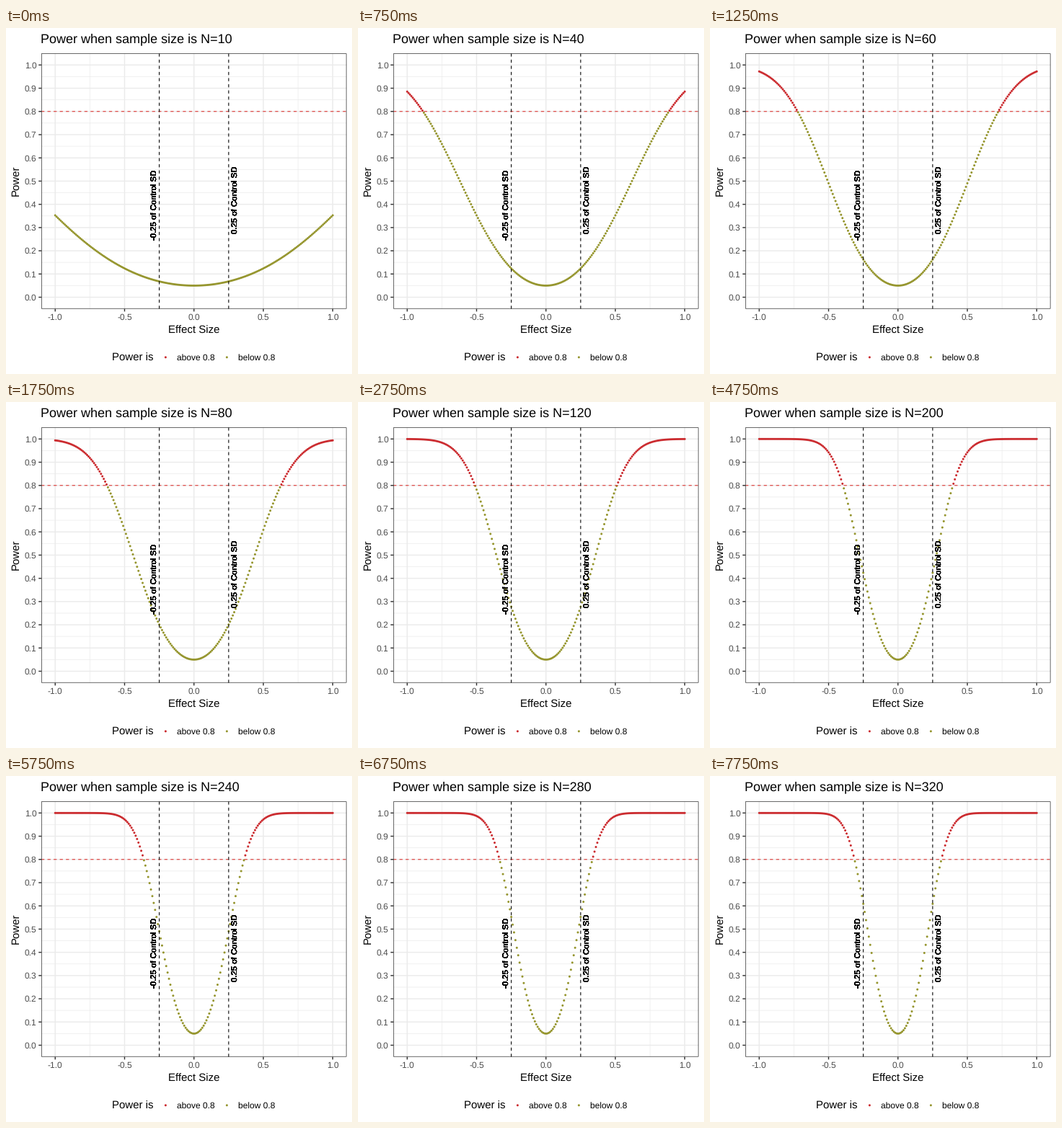
Write a matplotlib script that moves like this. It is 480 px wide and 480 px high and loops after 8000 ms.

```python
import math

import numpy as np
import matplotlib.pyplot as plt
from matplotlib.animation import FuncAnimation
from matplotlib.patches import Rectangle

plt.rcParams.update({
    "font.family": "Liberation Sans",
    "text.hinting": "none",
    "path.snap": False,
    "toolbar": "None",
})

SIZE = 480
STEPS = 32
LEFT, RIGHT, TOP, BOTTOM = 49, 472.5, 35.2, 389.6
RED, OLIVE, GUIDE_RED = "#cb2a2e", "#95952d", "#de302d"
GRID, DARK, TICK_TEXT = "#ebebeb", "#333333", "#4d4d4d"
DOT_AREA = 3.0 ** 2
Z_CRIT = 1.959964

# One point is one pixel at 72 dpi.
fig = plt.figure(figsize=(SIZE / 72, SIZE / 72), dpi=72, facecolor="white")
ax = fig.add_axes([0, 0, 1, 1])
ax.set_xlim(0, SIZE)
ax.set_ylim(SIZE, 0)
ax.axis("off")


def px(effect):
    return (LEFT + RIGHT) / 2 + effect * (RIGHT - LEFT) / 2.2


def py(power):
    return BOTTOM - (power + 0.05) * (BOTTOM - TOP) / 1.1


def line(x0, y0, x1, y1, color, width, z, style="-", snap=False):
    ax.plot([x0, x1], [y0, y1], color=color, lw=width, ls=style, zorder=z,
            snap=snap, solid_capstyle="butt", dash_capstyle="butt")


def label(x, y, text, size, color="black", ha="left", rotation=0):
    return ax.text(x, y, text, fontsize=size, color=color, ha=ha,
                   va="baseline", rotation=rotation,
                   rotation_mode="anchor", zorder=6)


def draw_panel():
    for x in (-0.75, -0.25, 0.25, 0.75):
        line(px(x), BOTTOM, px(x), TOP, GRID, 0.73, 1)
    for i in range(10):
        y = py(i / 10 + 0.05)
        line(LEFT, y, RIGHT, y, GRID, 0.73, 1)

    for x in (-1, -0.5, 0, 0.5, 1):
        line(px(x), BOTTOM, px(x), TOP, GRID, 1.45, 2)
        line(px(x), BOTTOM, px(x), BOTTOM + 3.75, DARK, 1.45, 5)
        label(px(x), 405, f"{x:.1f}", 12, TICK_TEXT, "center")
    for i in range(11):
        y = py(i / 10)
        line(LEFT, y, RIGHT, y, GRID, 1.45, 2)
        line(LEFT - 3.75, y, LEFT, y, DARK, 1.45, 5)
        label(42.3, y + 4.3, f"{i / 10:.1f}", 12, TICK_TEXT, "right")

    ax.add_patch(Rectangle((LEFT + 0.36, TOP + 0.36), RIGHT - LEFT - 0.72,
                           BOTTOM - TOP - 0.72, fill=False, ec=DARK,
                           lw=0.73, zorder=5))
    label(px(0), 424, "Effect Size", 15, ha="center")
    label(18, 211.5, "Power", 15, ha="center", rotation=90)


def draw_guides():
    dashed = (0, (4, 4))
    line(LEFT, py(0.8), RIGHT, py(0.8), GUIDE_RED, 1.067, 4, dashed, True)
    for x in (-0.25, 0.25):
        line(px(x), BOTTOM, px(x), TOP, "black", 1.067, 4, dashed, True)
    # Stacked copies harden the edges of the lettering.
    for _ in range(20):
        label(210, 245.5, "-0.25 of Control SD", 11.38,
              ha="center", rotation=90)
        label(322, 238.5, "0.25 of Control SD", 11.38,
              ha="center", rotation=90)


def draw_legend():
    label(147, 462, "Power is", 15)
    label(237, 461, "above 0.8", 12)
    label(322, 461, "below 0.8", 12)
    ax.scatter([221.4, 306.4], [456.8, 456.8], s=DOT_AREA,
               c=[RED, OLIVE], linewidths=0, zorder=3)


def normal_cdf(z):
    return 0.5 * (1 + math.erf(z / math.sqrt(2)))


def power_of(effect, n):
    shift = effect * math.sqrt(n) / 2
    return normal_cdf(shift - Z_CRIT) + normal_cdf(-shift - Z_CRIT)


draw_panel()
draw_guides()
draw_legend()

effects = np.linspace(-1, 1, 201)
dots = ax.scatter(px(effects), px(effects), s=DOT_AREA,
                  c=[OLIVE] * len(effects), linewidths=0, zorder=3)
title = label(48.5, 20, "", 18)


def update(step):
    n = 10 * (step + 1)
    power = np.array([power_of(e, n) for e in effects])
    dots.set_offsets(np.column_stack([px(effects), py(power)]))
    dots.set_facecolor([RED if p >= 0.8 else OLIVE for p in power])
    title.set_text(f"Power when sample size is N={n}")
    return dots, title


anim = FuncAnimation(fig, update, frames=STEPS, interval=250,
                     repeat=True, repeat_delay=0, blit=False)
plt.show()
```
